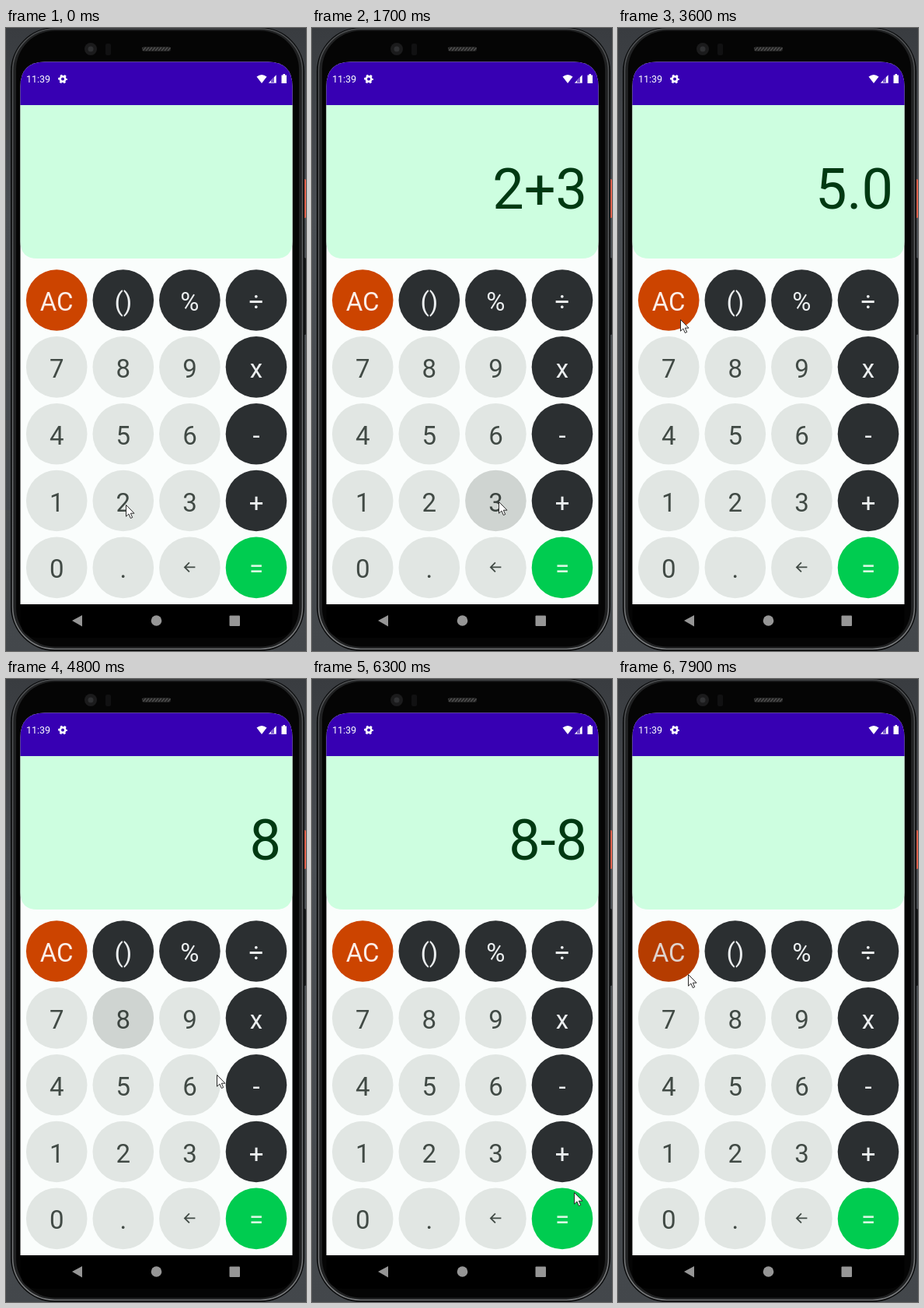
These frames come from a looping animation (386 by 800 pixels, 8000 ms). An HTML page:

```html
<!DOCTYPE html>
<html lang="en">
<head>
<meta charset="utf-8">
<title>Calculator</title>
<style>
  html, body { margin: 0; width: 100%; height: 100%; overflow: hidden; background: #44484c; }
  svg { display: block; width: 100%; height: 100%; font-family: Roboto, sans-serif; }
  #keys text { font-size: 33px; text-anchor: middle; }
</style>
</head>
<body>
<svg viewBox="0 0 386 800">
  <defs>
    <linearGradient id="wall" x2="0" y2="1">
      <stop stop-color="#393c40"/><stop offset=".3" stop-color="#4a4e53"/><stop offset="1" stop-color="#43474b"/>
    </linearGradient>
    <linearGradient id="rim" x2="0" y2="1">
      <stop stop-color="#4c4e50"/><stop offset=".5" stop-color="#5d5f61"/><stop offset="1" stop-color="#77797b"/>
    </linearGradient>
    <pattern id="mesh" width="4" height="6" patternUnits="userSpaceOnUse">
      <path d="M0 5L4 1" stroke="#555" stroke-width="1.2"/>
    </pattern>
  </defs>

  <!-- phone -->
  <rect width="386" height="800" fill="url(#wall)"/>
  <rect x="381" y="194" width="5" height="50" rx="1.5" fill="#dd604c"/>
  <rect x="381" y="295" width="5" height="99" rx="1.5" fill="#17191b"/>
  <rect x="6" y="-1" width="378" height="801" rx="57" fill="#08090a"/>
  <rect x="8.5" y="1" width="373" height="796.5" rx="54" fill="#202122" stroke="url(#rim)" stroke-width="1.6"/>
  <rect x="13" y="3.5" width="364" height="791" rx="50" fill="#050505"/>
  <circle cx="109" cy="27" r="8" fill="#1b1b1c"/>
  <circle cx="109" cy="27" r="3.5" fill="#303133"/>
  <rect x="128" y="20" width="7" height="15" rx="2" fill="#111112"/>
  <rect x="175" y="24" width="37" height="6" rx="3" fill="#242424"/>
  <rect x="175" y="24" width="37" height="6" rx="3" fill="url(#mesh)"/>

  <!-- screen -->
  <path d="M18.5 740V75Q18.5 43.5 50 43.5H337Q368.500 43.500 368.500 75V740Z" fill="#fafdfc"/>
  <path d="M18.5 99V75Q18.5 43.5 50 43.5H337Q368.500 43.500 368.500 75V99Z" fill="#3700b3"/>
  <path d="M18.500 99H368.500V274Q368.500 296 346.500 296H40.500Q18.500 296 18.500 274Z" fill="#cdfee0"/>
  <path d="M18.500 740H368.500V760Q368.500 783 345 783H42Q18.500 783 18.500 760Z" fill="#000"/>

  <!-- status bar -->
  <g fill="#fff">
    <text x="26" y="70.300" font-size="12.500">11:39</text>
    <g fill="none" stroke="#fff">
      <circle cx="73" cy="65.500" r="3.300" stroke-width="2.600"/>
      <circle cx="73" cy="65.500" r="4.900" stroke-width="2" stroke-dasharray="2.566" stroke-dashoffset="1.280"/>
    </g>
    <path d="M322.500 62.500Q329 57.500 335.500 62.500L329 71Z"/>
    <path d="M337.500 71L348 60V71Z" fill-opacity=".35"/>
    <path d="M338 70.500L347.500 60.500V70.500Z M345 63L341 67V71H345Z" fill-rule="evenodd"/>
    <path d="M354.500 60.500H356.500V59H359V60.500H361V71H354.500Z"/>
  </g>

  <!-- navigation -->
  <g fill="#969696">
    <path d="M85 761L98 754V768.500Z"/>
    <circle cx="193.500" cy="761" r="6.800"/>
    <rect x="287.500" y="754.500" width="13.500" height="13.500" rx="1"/>
  </g>

  <text id="out" x="354" y="231.500" font-size="72" text-anchor="end" fill="#003912"></text>
  <g id="keys"></g>
  <path id="cursor" d="M.5 .5V15.200L3.900 12L6.300 17.500L8.700 16.500L6.300 11.200H11Z" fill="#fff" stroke="#2a2a2a" stroke-width="1"/>
</svg>
<script>
const LOOP = 8000, STEP = 100, PRESS = 500;
const $ = id => document.getElementById(id);

function add(parent, tag, attrs, text = '') {
  const el = document.createElementNS('http://www.w3.org/2000/svg', tag);
  for (const name in attrs) el.setAttribute(name, attrs[name]);
  el.textContent = text;
  return parent.appendChild(el);
}

const digit = { fill: '#e1e6e3', ink: '#414a45', dim: 0.08 };
const operator = { fill: '#2b2f31', ink: '#eceff0', dim: 0.08 };
const special = {
  'AC': { fill: '#cc4400', ink: '#fbeee8', dim: 0.115 },
  '=': { fill: '#00cc50', ink: '#d8f8e3', dim: 0.115 }
};
const shades = {};

['AC', '()', '%', '÷', '7', '8', '9', 'x', '4', '5', '6', '-',
 '1', '2', '3', '+', '0', '.', '←', '='].forEach((label, i) => {
  const col = i % 4, row = Math.floor(i / 4);
  const x = 65.2 + col * 85.6, y = 349.5 + row * 85.85;
  const style = special[label] || (row === 0 || col === 3 ? operator : digit);
  const circle = { cx: x, cy: y, r: 39.3 };
  add($('keys'), 'circle', { ...circle, fill: style.fill });
  if (label === '←') {
    add($('keys'), 'path', {
      d: `M${x + 7} ${y - 0.5}h-13.500m6 -6l-6 6l6 6`,
      fill: 'none', stroke: style.ink, 'stroke-width': 1.8
    });
  } else {
    add($('keys'), 'text', { x, y: y + 13.5, fill: style.ink }, label);
  }
  shades[label] = { el: add($('keys'), 'circle', { ...circle, opacity: 0 }), dim: style.dim };
});

// time, key, display after the press
const presses = [
  [200, '2', '2'], [900, '+', '2+'], [1600, '3', '2+3'], [2200, '=', '5.0'],
  [3800, 'AC', ''], [4500, '8', '8'], [5300, '-', '8-'], [5700, '8', '8-8'],
  [6600, '=', '0.0'], [7900, 'AC', '']
];

// time, x, y of the pointer
const path = [
  [0, 154, 612], [400, 154, 612], [900, 330, 599], [1100, 330, 599],
  [1500, 240, 608], [1700, 240, 608], [2200, 339, 690], [2500, 339, 690],
  [2700, 338, 704], [2800, 338, 704], [3300, 60, 340], [3600, 80, 374],
  [3800, 80, 374], [4300, 150, 436], [4500, 150, 436], [4800, 271, 508],
  [5100, 324, 511], [5300, 324, 511], [5600, 156, 440], [5800, 156, 440],
  [6100, 340, 587], [6300, 337, 659], [6500, 340, 690], [7000, 340, 690],
  [7500, 71, 360], [7700, 90, 379], [8000, 90, 379]
];

// Velocity at a point; zero where the pointer rests
function slope(i, axis) {
  const a = path[i - 1], b = path[i], c = path[i + 1];
  if (!a || !c || (b[axis] - a[axis]) * (c[axis] - b[axis]) <= 0) return 0;
  return (c[axis] - a[axis]) / (c[0] - a[0]);
}

function along(t, axis) {
  const i = path.findIndex(p => p[0] > t) - 1;
  const a = path[i], b = path[i + 1], span = b[0] - a[0];
  const u = (t - a[0]) / span, v = 1 - u;
  return a[axis] * v * v * (1 + 2 * u) + b[axis] * u * u * (3 - 2 * u)
    + span * u * v * (slope(i, axis) * v - slope(i + 1, axis) * u);
}

function draw(now) {
  const t = Math.floor(now % LOOP / STEP) * STEP;
  let shown = '';
  for (const key in shades) shades[key].el.setAttribute('opacity', 0);
  for (const [at, key, text] of presses) {
    const age = t - at;
    if (age < 0) break;
    shown = text;
    if (age < PRESS) {
      const fade = Math.min(1, (PRESS - age) / 200);
      shades[key].el.setAttribute('opacity', shades[key].dim * fade);
    }
  }
  $('out').textContent = shown;
  $('cursor').setAttribute('transform', `translate(${along(t, 1)} ${along(t, 2)})`);
  requestAnimationFrame(draw);
}
requestAnimationFrame(draw);
</script>
</body>
</html>
```
